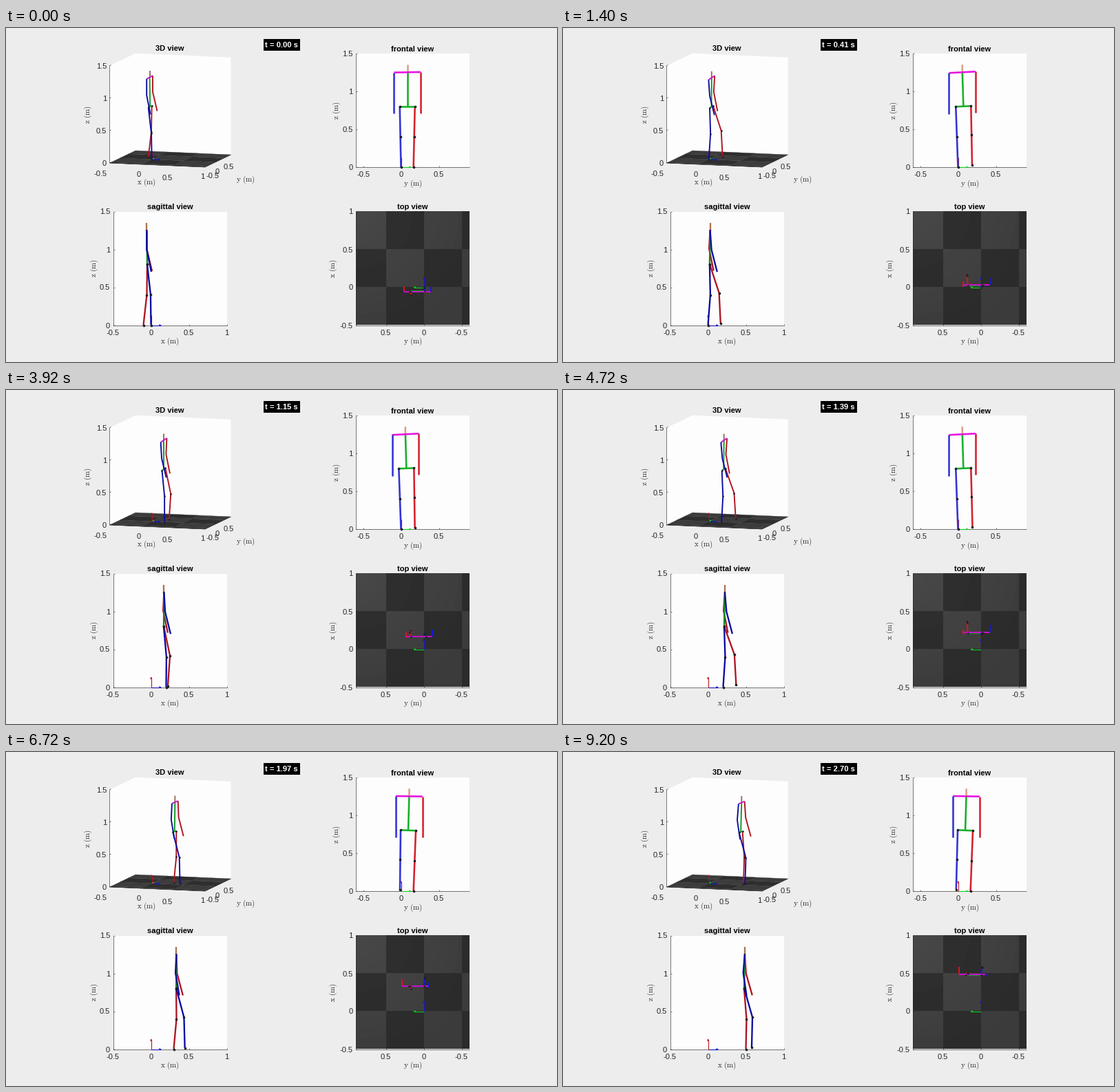
Write a matplotlib script that moves like this. It is 800x485 px and loops after 9.24 s.

```python
import numpy as np
import matplotlib.pyplot as plt
from matplotlib.animation import FuncAnimation
from matplotlib.patches import Polygon, Rectangle

W, H, DPI = 800, 485, 80
FRAMES, INTERVAL = 231, 40
PT = 72 / DPI                       # points per pixel

plt.rcParams["font.family"] = "Liberation Sans"
plt.rcParams["mathtext.fontset"] = "cm"

fig = plt.figure(figsize=(W / DPI, H / DPI), dpi=DPI, facecolor="#ededee")
ax = fig.add_axes([0, 0, 1, 1])
ax.axis("off")

INK = "#262626"

# Projections from metres (x, y, z) to stage pixels
VIEWS = {
    "3d": lambda x, y, z: (211.7 + 92.3 * x + 25 * y,
                           190.8 + 4 * x - 12 * y - 94.2 * z),
    "front": lambda x, y, z: (573.5 + 110 * y, 202 - 110 * z),
    "side": lambda x, y, z: (210.5 + 110 * x, 431.5 - 110 * z),
    "top": lambda x, y, z: (606.5 - 110 * y, 376.5 - 110 * x),
}


def label(x, y, text, ha="center", **kw):
    kw = {"fontsize": 11.1 * PT, "color": INK, **kw}
    return ax.text(x, y, text, ha=ha, va="center_baseline", **kw)


def title(x, y, text):
    label(x, y, text, weight="bold", color="black")


def axis_name(x, y, letter, rotation=0):
    ax.text(x, y, r"$\mathrm{%s\ (m)}$" % letter, ha="center", va="center",
            fontsize=11 * PT, color=INK, rotation=rotation)


def stroke(pts, color=INK, width=0.6, z=3):
    xs, ys = zip(*pts)
    return ax.plot(xs, ys, color=color, lw=width * PT, zorder=z,
                   solid_capstyle="butt")[0]


def flat_panel(left, top, name, xticks, yticks, xname, yname, name_x):
    """A square plot with ticks; each tick is (pixel, text)."""
    right, bottom = left + 165, top + 165
    title(left + 82.5, top - 7.5, name)
    stroke([(left, top), (left, bottom), (right, bottom)])
    for px, text in xticks:
        stroke([(px, bottom), (px, bottom - 2)])
        label(px, bottom + 10.5, text)
    for py, text in yticks:
        stroke([(left, py), (left + 2, py)])
        label(left - 4.5, py, text, ha="right")
    axis_name(left + 82.5, bottom + 24, xname)
    axis_name(name_x, top + 82.5, yname, 90)


def is_light(x, y):
    return (np.floor(x / 0.5) + np.floor(y / 0.5)) % 2 == 0


def draw_3d_room():
    p = VIEWS["3d"]
    wall = [p(-.5, -.6, 0), p(-.5, -.6, 1.5), p(-.5, .9, 1.5),
            p(1, .9, 1.5), p(1, .9, 0), p(1, -.6, 0)]
    ax.add_patch(Polygon(wall, fc="#fdfdfd", ec="none", zorder=1))
    ys = [-.6, -.5, 0, .5, .9]
    for x in (-.5, 0, .5):
        for y0, y1 in zip(ys, ys[1:]):
            tone = "#3c3c3c" if is_light(x + .1, (y0 + y1) / 2) else "#2e2e2e"
            tile = [p(x, y0, 0), p(x + .5, y0, 0),
                    p(x + .5, y1, 0), p(x, y1, 0)]
            ax.add_patch(Polygon(tile, fc=tone, ec=tone, lw=.3, zorder=2))
    stroke([p(-.5, -.6, 1.5), p(-.5, -.6, 0), p(1, -.6, 0), p(1, .9, 0)])
    title(238, 29, "3D view")
    for i, text in enumerate(("0", "0.5", "1", "1.5")):
        x, y = p(-.5, -.6, i / 2)
        stroke([(x, y), (x + 2, y - 1)])
        label(146, y, text, ha="right")
    for x, y, text in ((137, 211, "-0.5"), (193, 212, "0"), (234, 217, "0.5"),
                       (285, 215, "1"), (300, 214, "-0.5"), (307, 208, "0"),
                       (323.5, 201, "0.5")):
        label(x, y, text)
    axis_name(204, 224, "x")
    axis_name(348, 220, "y")
    axis_name(119, 126, "z", 90)


def draw_panels():
    for left, top in ((508, 37), (155.5, 266.5)):
        ax.add_patch(Rectangle((left, top), 165, 165, fc="#fdfdfd",
                               ec="none", zorder=1))
    rows, cols = np.mgrid[0:165, 0:165] + .5
    light = is_light(1 - rows / 110, .9 - cols / 110)
    glow = np.clip(1 - np.hypot(rows, cols) / 190, 0, 1)
    tone = np.where(light, 59 + 13 * glow, 43 + 5 * glow) / 255
    ax.imshow(tone, cmap="gray", vmin=0, vmax=1, aspect="auto", zorder=1,
              extent=(508, 673, 431.5, 266.5), interpolation="nearest")

    def heights(bottom):
        return [(bottom - 55 * i, t)
                for i, t in enumerate(("0", "0.5", "1", "1.5"))]

    flat_panel(508, 37, "frontal view",
               [(518.5, "-0.5"), (573.5, "0"), (628.5, "0.5")],
               heights(202), "y", "z", 480)
    flat_panel(155.5, 266.5, "sagittal view",
               [(155.5, "-0.5"), (210.5, "0"), (265.5, "0.5"), (320.5, "1")],
               heights(431.5), "x", "z", 128)
    flat_panel(508, 266.5, "top view",
               [(551.5, "0.5"), (606.5, "0"), (661.5, "-0.5")],
               [(266.5, "1"), (321.5, "0.5"), (376.5, "0"), (431.5, "-0.5")],
               "y", "x", 475)


def draw_origin_axes():
    arms = (((.13, 0, 0), "#1515c8"), ((0, .13, 0), "#10d020"),
            ((0, 0, .13), "#b81420"))
    for p in VIEWS.values():
        for tip, color in arms:
            a, b = np.array(p(0, 0, 0)), np.array(p(*tip))
            d = b - a
            size = np.hypot(*d)
            if size < 1:
                continue
            stroke([a, b], color, 1.1, 4)
            d /= size
            n = np.array((-d[1], d[0]))
            head = [b + d, b - 2.5 * d + 1.4 * n, b - 2.5 * d - 1.4 * n]
            ax.add_patch(Polygon(head, fc=color, ec="none", zorder=4))


def knee(hip, foot, bend):
    """Joint pushed forward from the middle of the leg."""
    d = foot - hip
    normal = np.array((-d[2], 0, d[0])) / np.hypot(d[0], d[2])
    return (hip + foot) / 2 + bend * normal


def arm(shoulder, elbow_dx, hand_dx):
    elbow = shoulder + (elbow_dx, 0, -np.sqrt(.25 ** 2 - elbow_dx ** 2))
    dx = hand_dx - elbow_dx
    return elbow, elbow + (dx, 0, -np.sqrt(.3 ** 2 - dx ** 2))


def pose(t):
    """Joint positions of the walker; blue stands on even steps."""
    s = t / .55 if t < .55 else 1 + (t - .55) / .5
    k = int(s)
    p = s - k
    wave = np.sin(np.pi * p)
    side = 1 if k % 2 == 0 else -1
    sway = side * np.tanh(4 * wave)
    swing = side * wave

    hip_x = .1 * k - .05 + .1 * p - .004 * wave
    hip_y = .0835 - .0125 * sway
    pelvis = np.array((hip_x, hip_y, .802))
    half = np.array((0, .1, .004 * sway))
    chest = np.array((hip_x - .006 + .018 * wave, .0835 - .026 * sway, 1.252))
    wide = np.array((0, .176, .003 + .006 * sway))

    stance = np.array((.1 * k, 0, 0))
    step = np.array((.1 * k - .1 + .2 * p + .152 * wave
                     - .008 * np.sin(2 * np.pi * p),
                     side * .03 * wave,
                     .033 * np.sin(np.pi * p ** 1.2)))
    bend = .02 + .042 * np.sqrt(np.sin(np.pi * p ** .85))
    blue_foot, red_foot = (stance, step) if side > 0 else (step, stance)
    red_foot = red_foot + (0, .165, 0)
    bends = (.02, bend) if side > 0 else (bend, .02)

    j = {"pelvis": pelvis, "chest": chest,
         "head": chest + (0, -.001 * sway, .1),
         "b_hip": pelvis - half, "r_hip": pelvis + half,
         "b_foot": blue_foot, "r_foot": red_foot,
         "b_shoulder": chest - wide, "r_shoulder": chest + wide}
    j["b_knee"] = knee(j["b_hip"], blue_foot, bends[0])
    j["r_knee"] = knee(j["r_hip"], red_foot, bends[1])
    j["b_elbow"], j["b_hand"] = arm(j["b_shoulder"], .025 * swing,
                                    .06 + .045 * swing)
    j["r_elbow"], j["r_hand"] = arm(j["r_shoulder"], -.02 * swing,
                                    .07 - .035 * swing)
    return j


# Far parts first
PARTS = (("red", "r_shoulder r_elbow r_hand"), ("red", "r_hip r_knee r_foot"),
         ("green", "b_hip r_hip"), ("green", "pelvis chest"),
         ("tan", "chest head"), ("blue", "b_hip b_knee b_foot"),
         ("pink", "b_shoulder r_shoulder"),
         ("blue", "b_shoulder b_elbow b_hand"))
DOTS = "b_hip r_hip b_knee r_knee b_foot r_foot".split()

SHADES = {
    "3d": dict(red="#b01420", blue="#0c0ca0", green="#109a24",
               tan="#9c6c58", pink="#c818c8"),
    "front": dict(red="#d6222e", blue="#3434d6", green="#18b02c",
                  tan="#dca088", pink="#e614e0"),
    "side": dict(red="#ac1420", blue="#0a0aa2", green="#0f8c20",
                 tan="#a87452", pink="#3c1450"),
    "top": dict(red="#d01822", blue="#1818d0", green="#129c22",
                tan="#b07c64", pink="#c410c4"),
}
WIDTHS = {"3d": 1.9, "front": 2.6, "side": 2.3, "top": 2.1}
DOT_SIZE = {"3d": 2.6, "front": 3.6, "side": 3.6, "top": 2.6}


def make_limbs():
    limbs, dots = [], []
    for view, p in VIEWS.items():
        for i, (color, names) in enumerate(PARTS):
            line = ax.plot([], [], color=SHADES[view][color],
                           lw=WIDTHS[view] * PT, zorder=5 + i * .1,
                           solid_capstyle="butt", solid_joinstyle="round")[0]
            limbs.append((line, p, names.split()))
        mark = ax.plot([], [], "o", ms=DOT_SIZE[view] * PT, mew=0,
                       color="#1c1c24", zorder=7)[0]
        dots.append((mark, p, DOTS))
    return limbs + dots


draw_3d_room()
draw_panels()
draw_origin_axes()
ax.add_patch(Rectangle((374, 15.5), 52.5, 17.5, fc="black", ec="none",
                       zorder=8))
clock = label(400, 24.5, "", weight="bold", color="white", zorder=9)
limbs = make_limbs()
ax.set_xlim(0, W)
ax.set_ylim(H, 0)


def update(i):
    t = max(0, .01175 * i - .001)
    clock.set_text(f"t = {t:.2f} s")
    joints = pose(t)
    for line, p, names in limbs:
        line.set_data(*p(*np.array([joints[n] for n in names]).T))
    return [clock] + [line for line, _, _ in limbs]


anim = FuncAnimation(fig, update, frames=FRAMES, interval=INTERVAL,
                     repeat=True, repeat_delay=0, blit=False)
plt.show()
```
